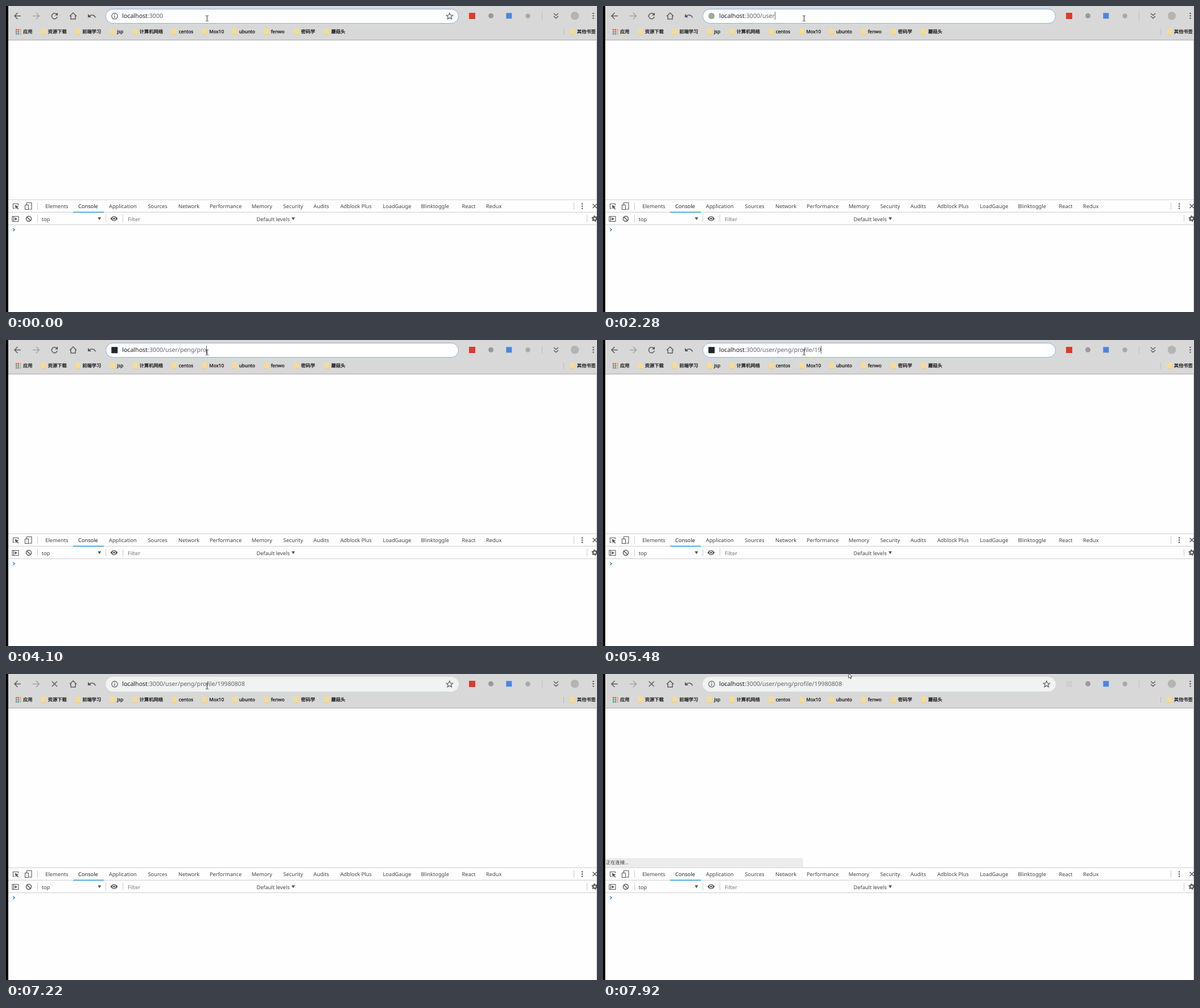
An HTML page for the animation above (8 s loop, 1039x539 px).

```html
<!DOCTYPE html>
<html lang="zh-CN">
<head>
<meta charset="utf-8">
<title>Browser address bar</title>
<style>
  html, body { margin: 0; width: 100%; height: 100%; overflow: hidden; background: #fff; }
  svg { display: block; width: 1039px; height: 539px; }
  text { font-family: "Noto Sans", "Noto Sans CJK SC", "Noto Sans CJK", sans-serif; text-rendering: geometricPrecision; white-space: pre; }
  .url { font-size: 10.6px; fill: #5f6368; }
  .host { fill: #202124; }
  .marks text { font-size: 8.25px; font-weight: 500; fill: #111; stroke: #111; stroke-width: .25; }
  .tools text { font-size: 9.25px; fill: #444; }
  .line { fill: none; stroke: #5a5d61; stroke-width: 1.5; }
  .thin { fill: none; stroke: #5a5a5a; stroke-width: 1.1; }
  .rule { fill: none; stroke: #ccc; stroke-width: 1; }
  .solid { fill: #555; }
  .hidden { display: none; }
</style>
</head>
<body>
<svg viewBox="0 0 1039 539">
  <rect width="1039" height="539" fill="#fefefe"/>
  <rect width="1039" height="60" fill="#d8d8d8"/>
  <path d="M4 60H1039" stroke="#a4a4a4"/>
  <path d="M1038.5 61V539" stroke="#c4c4c4"/>

  <!-- navigation -->
  <path class="line" d="M26 17.5H15.5M20.5 12L15 17.5L20.5 23"/>
  <path class="line" style="stroke:#a4a4a4" d="M47 17.5H58M53 12L58.5 17.5L53 23"/>
  <g id="reload">
    <path class="line" d="M89 14.2A5 5 0 1 0 90.2 19"/>
    <path class="solid" d="M91 11.5V16.5H86Z"/>
  </g>
  <path id="stop" class="line" d="M80.8 13L89.8 22M89.8 13L80.8 22"/>
  <path class="line" d="M112 18L118 12L124 18M114 17V23H122V17"/>
  <path class="line" d="M146 18C150 14.5 155 15.5 157.5 20.5"/>
  <path class="solid" d="M144 14V20H150Z"/>

  <!-- address bar -->
  <rect id="bar" x="175.5" y="5.5" width="620" height="25" rx="12.5"/>
  <g id="info">
    <circle class="line" style="stroke-width:1.2" cx="191" cy="17.8" r="5.2"/>
    <path class="line" style="stroke-width:1.3" d="M191 17V21M191 14.6V15.9"/>
  </g>
  <circle id="pale" cx="190.8" cy="17.5" r="5.5" fill="#a3a69b"/>
  <rect id="dark" x="185.3" y="12.2" width="11" height="11" rx="1" fill="#20262c"/>
  <text class="url" x="204.2" y="21.2"><tspan class="host">localhost</tspan>:3000<tspan id="path"></tspan></text>
  <path id="caret" d="M.5 10V24" stroke="#666"/>
  <path id="star" class="line" style="stroke-width:1.2" d="M779.8 12.2L781.4 16L785.5 16.3L782.4 19L783.4 23L779.8 20.8L776.2 23L777.2 19L774.1 16.3L778.2 16Z"/>

  <!-- extensions -->
  <rect id="ext" x="814" y="12" width="11" height="11"/>
  <circle cx="852.5" cy="17.3" r="4.5" fill="#9a9a9a"/>
  <rect x="879.3" y="12.3" width="10" height="10" fill="#4a86e0"/>
  <circle cx="917.5" cy="17.5" r="4.2" fill="#a9a9a9"/>
  <path d="M942.5 11V24" stroke="#bcbcbc"/>
  <path class="line" d="M963 13L967 16.5L971 13M963 18L967 21.5L971 18"/>
  <circle cx="1000" cy="17.3" r="7.2" fill="#b4b5ae"/>
  <g class="solid"><circle cx="1032.5" cy="13" r="1.2"/><circle cx="1032.5" cy="17.3" r="1.2"/><circle cx="1032.5" cy="21.6" r="1.2"/></g>

  <g id="marks" class="marks">
    <text x="30" y="48.2">应用</text>
    <path d="M980.5 40V51" stroke="#bcbcbc"/>
  </g>

  <!-- connection status -->
  <g id="status">
    <path d="M4 325H348.5Q351 325 351 327.5V340.5H4Z" fill="#ececec"/>
    <path d="M4 325.3H348.5Q350.7 325.3 350.7 327.5V340.5" fill="none" stroke="#dcdcdc" stroke-width=".6"/>
    <text x="5" y="335.3" font-size="8.3" fill="#333">正在连接...</text>
  </g>

  <!-- developer tools -->
  <g id="tools" class="tools">
    <path class="rule" d="M4 341.2H1038M4 363.2H1038M4 385.2H1038"/>
    <path class="rule" d="M55.5 346V359M998.5 346V359M55.5 368V381M175.5 368V381M205.5 368V381M1021.5 368V381"/>
    <path d="M118 363.2H172" stroke="#2f9bd6" stroke-width="1.5"/>
    <path class="thin" d="M15 356.5H12.5V348.5H21.5V351"/>
    <path class="solid" d="M15.5 350.5L22.5 353.5L19.6 354.6L22.3 357.4L21.2 358.4L18.5 355.6L17.3 358Z"/>
    <path class="thin" d="M36.5 350V346.5H45V358H40.5M33.5 350.5H39.5V358.5H33.5Z"/>
    <g class="solid"><circle cx="1013" cy="348.5" r="1.2"/><circle cx="1013" cy="352.5" r="1.2"/><circle cx="1013" cy="356.5" r="1.2"/></g>
    <path class="line" d="M1031.5 348.8L1038.7 356M1038.7 348.8L1031.5 356"/>

    <path class="thin" d="M11 370.5H22V379.5H11ZM13.5 370V380"/>
    <path class="solid" d="M15.5 372.3L20 375L15.5 377.7Z"/>
    <circle class="line" cx="40" cy="374.8" r="4.5"/>
    <path class="line" d="M36.8 371.6L43.2 378"/>
    <text x="62.7" y="378.5">top</text>
    <path class="solid" d="M161.3 372.2H167.3L164.3 377.2Z"/>
    <path class="solid" d="M183.5 374.5Q190 366 196.5 374.5Q190 383 183.5 374.5Z"/>
    <circle cx="190" cy="374.5" r="2.9" fill="#fff"/><circle class="solid" cx="190" cy="374.5" r="1.7"/>
    <text x="214" y="378.5" style="fill:#777">Filter</text>
    <text x="440.5" y="378.5">Default levels</text>
    <path class="solid" d="M502 372.2H508L505 377.2Z"/>
    <circle cx="1035" cy="374.5" r="3" fill="none" stroke="#555" stroke-width="2"/>
    <circle cx="1035" cy="374.5" r="4.6" fill="none" stroke="#555" stroke-width="1.8" stroke-dasharray="2.2 2.617"/>
    <path d="M12.3 391.5L15.2 394L12.3 396.5" fill="none" stroke="#2f7de0" stroke-width="1.4"/>
  </g>

  <!-- pointers -->
  <path id="beam" d="M-2 .5H-.5L.5 1.2L1.5 .5H3M.5 1V9.5M-2 9.8H-.5L.5 9.2L1.5 9.8H3" fill="none" stroke="#333"/>
  <path id="arrow" d="M431.8 -1.5V7.3L433.8 5.6L435 8.4L436.5 7.7L435.3 5H437.8Z" fill="#fff" stroke="#333" stroke-width=".9"/>
  <rect width="4" height="539" fill="#000"/>
</svg>
<script>
  const LOOP = 8000;
  const PATH = "/user/peng/profile/19980808";
  // time, characters typed, caret hidden
  const STEPS = [
    [0, 0, 1], [310, 0], [770, 1], [1180, 1, 1], [1760, 1], [2010, 2], [2160, 3], [2280, 5],
    [2560, 6], [2710, 7], [2830, 9], [2980, 10], [3130, 11], [3710, 11, 1], [3830, 12],
    [3950, 13], [4100, 14], [4230, 16], [4370, 17], [4500, 18], [4620, 19], [5210, 19, 1],
    [5360, 20], [5480, 21], [5600, 22], [5910, 23], [6060, 24], [6180, 25], [6300, 26],
    [6440, 27], [6840, 27, 1]
  ];
  const $ = id => document.getElementById(id);
  const url = document.querySelector(".url");

  function add(parent, tag, attrs, label = "") {
    const el = document.createElementNS("http://www.w3.org/2000/svg", tag);
    for (const key in attrs) el.setAttribute(key, attrs[key]);
    el.textContent = label;
    parent.append(el);
  }

  const bookmarks = {
    资源下载: 74, 前端学习: 134.5, jsp: 195.5, 计算机网络: 235, centos: 304, Mox10: 357.5,
    ubunto: 410, fenwo: 466, 密码学: 519, 蘑菇头: 572, 其他书签: 1004
  };
  for (const [label, x] of Object.entries(bookmarks)) {
    add($("marks"), "rect", { x: x - 12, y: 40, width: 7.5, height: 10.5, rx: 1, fill: "#f9dc8c" });
    add($("marks"), "path", { d: `M${x - 12} 50.1h7.5`, stroke: "#e8c56c", "stroke-width": .8 });
    add($("marks"), "text", { x: x - .3, y: 48.2 }, label);
  }

  const dots = ["#dd4b3e", "#dd4b3e", "#e9a23b", "#3f9c5a", "#4a80dc", "#e9a23b", "#3f9c5a", "#4a80dc", "#e9a23b"];
  dots.forEach((fill, i) => add($("marks"), "rect", {
    x: 17 + i % 3 * 3.6, y: 40.7 + Math.floor(i / 3) * 3.6, width: 2.4, height: 2.4, fill
  }));

  const tabs = {
    Elements: 69.3, Console: 127, Application: 181, Sources: 249.5, Network: 303, Performance: 358,
    Memory: 431.7, Security: 487.5, Audits: 540.5, "Adblock Plus": 587.7, LoadGauge: 662.5,
    Blinktoggle: 729.5, React: 801.5, Redux: 844
  };
  for (const [label, x] of Object.entries(tabs)) {
    add($("tools"), "text", { x, y: 356.3, style: label === "Console" ? "fill:#222" : "" }, label);
  }

  const show = (id, on) => $(id).classList.toggle("hidden", !on);

  function draw() {
    const t = performance.now() % LOOP;
    const [, typed, blink] = STEPS.findLast(step => step[0] <= t);
    const loading = t >= 7220;
    const editing = t >= 770 && !loading;
    const suggested = (t >= 2010 && t < 2710) || (t >= 4500 && t < 4620);

    $("path").textContent = PATH.slice(0, typed);
    const end = Math.round(204 + url.getComputedTextLength());
    $("caret").setAttribute("transform", `translate(${end} 0)`);
    show("caret", !blink);
    show("info", !editing);
    show("star", !editing);
    show("pale", editing && suggested);
    show("dark", editing && !suggested);

    $("bar").setAttribute("fill", loading ? "#f1f2f2" : "#fff");
    $("bar").setAttribute("stroke", loading ? "#f1f2f2" : "#86b3ec");
    show("reload", !loading);
    show("stop", loading);
    show("status", t >= 7470);
    $("ext").setAttribute("fill", t < 7620 ? "#df3a2c" : "#cfcfcf");

    $("beam").setAttribute("transform", t < 7770 ? "translate(353 16.6)" : "translate(424 5)");
    show("beam", t < 7920);
    show("arrow", t >= 7920);
    requestAnimationFrame(draw);
  }
  draw();
</script>
</body>
</html>
```
